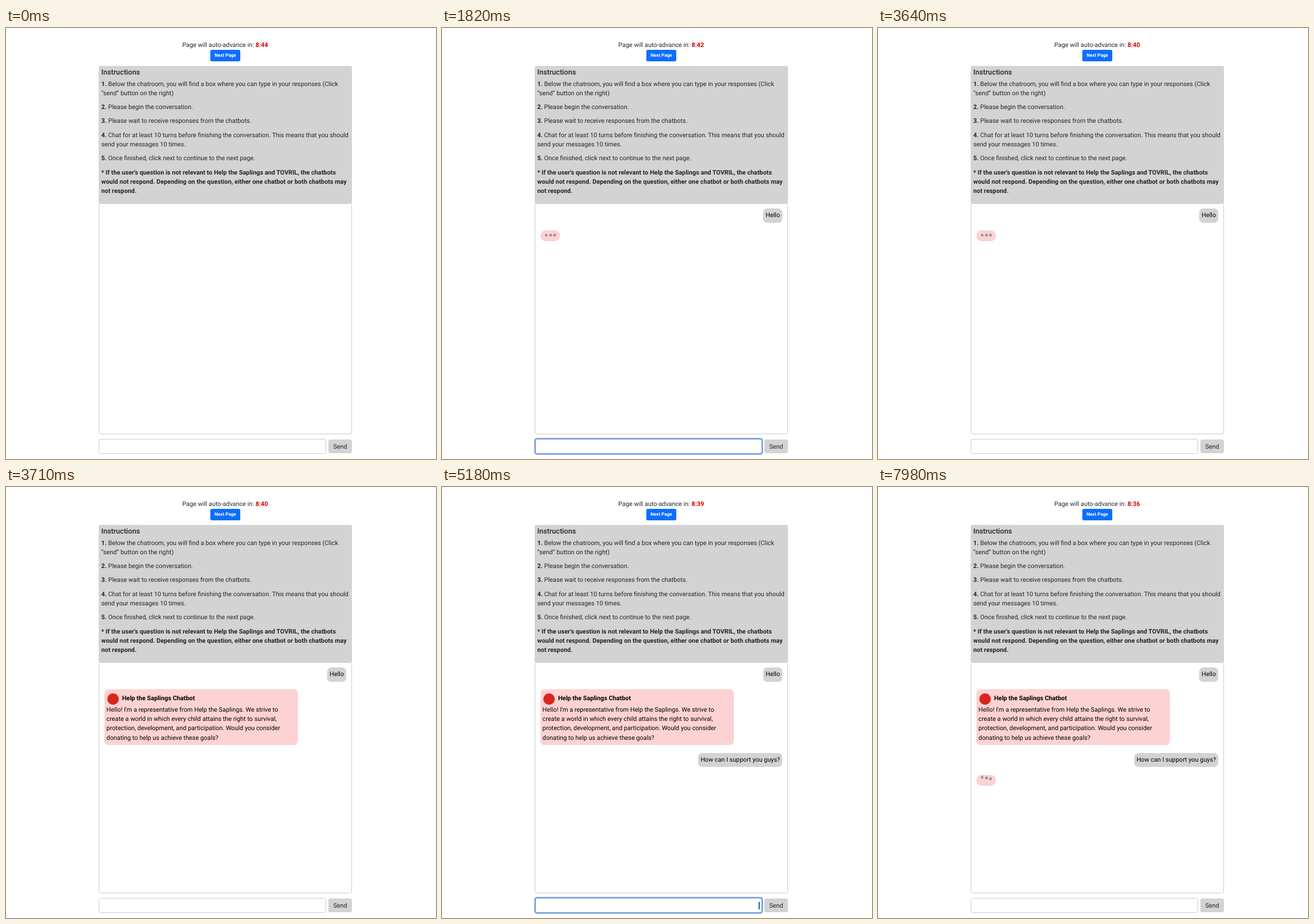
Recreate the animation shown at these times as an HTML page. Size 747 by 750 pixels, loop 8 s.

```html
<!DOCTYPE html>
<html lang="en">
<head>
<meta charset="utf-8">
<title>Chatroom</title>
<style>
html, body { margin: 0; width: 100%; height: 100%; overflow: hidden; background: #fff; }
#stage {
  position: relative; width: 747px; height: 750px; overflow: hidden; background: #fff;
  font: 10.8px/16.2px Roboto, Arial, sans-serif; color: #212529;
  text-rendering: geometricPrecision;
}
#stage div { position: absolute; box-sizing: border-box; white-space: pre; }
b { font-weight: 700; }
.gray { background: #d3d3d3; }
.field { border: 1px solid #ccc; border-radius: 3.5px; background: #fff; }
.mine { right: 155.8px; height: 24.6px; padding: 4.05px; border-radius: 6.75px; color: #000; }
.pink { background: #fdd2d2; left: 170.5px; color: #000; }
.dot { width: 4.8px; height: 4.8px; top: 6px; border-radius: 50%; background: #959595; }
#rules { font-size: 10.84px; }
#timer { color: #d20000; font-weight: 700; }
#typed { right: 197.6px; top: 720px; color: #212529; }
#ring { left: 161px; top: 714px; width: 396px; height: 28px; border: 2px solid #7199dc; border-radius: 4px; box-shadow: 0 0 0 1px #b4cbef; }
#caret { left: 550px; top: 722px; width: 2px; height: 13px; background: #1d5fb8; }
#beam { position: absolute; left: 467px; top: 721px; }
</style>
</head>
<body>
<div id="stage">
  <div style="left:306.3px;top:21.6px">Page will auto-advance in:</div>
  <div id="timer" style="left:433.6px;top:21.6px"></div>
  <div style="left:355px;top:38px;width:52px;height:20px;border-radius:2.5px;background:#0d6efd;color:#fff;font-size:8.1px;font-weight:700;line-height:18.4px;text-align:center">Next Page</div>

  <div class="gray" style="left:161px;top:66px;width:440px;height:239px;border-radius:3.4px 3.4px 0 0"></div>
  <div style="left:165.4px;top:70.2px;font-size:12.6px;font-weight:500">Instructions</div>
  <div id="rules"></div>

  <div class="field" style="left:161px;top:305px;width:440px;height:402px"></div>
  <div class="mine gray" id="hello" style="top:314.2px">Hello</div>
  <div class="pink" id="reply" style="top:352px;width:336.6px;height:96.6px;border-radius:6.75px">
    <div style="left:5.5px;top:6.5px;width:20px;height:20px;border-radius:50%;background:#d8271f"></div>
    <div style="left:31.2px;top:7.8px"><b>Help the Saplings Chatbot</b></div>
    <div style="left:4.1px;top:28px">Hello! I'm a representative from Help the Saplings. We strive to
create a world in which every child attains the right to survival,
protection, development, and participation. Would you consider
donating to help us achieve these goals?</div>
  </div>
  <div class="mine gray" id="ask" style="top:462.9px">How can I support you guys?</div>
  <div class="pink" id="wait" style="width:34.6px;height:19px;border-radius:9px">
    <div class="dot" style="left:8px"></div>
    <div class="dot" style="left:15.4px"></div>
    <div class="dot" style="left:22.7px"></div>
  </div>

  <div class="field" style="left:161px;top:714.6px;width:395px;height:26.6px"></div>
  <div id="ring"></div>
  <div id="typed"></div>
  <div id="caret"></div>
  <svg id="beam" width="11" height="16"><path d="M3 1.5Q5.5 1.5 5.5 3.5V12.5Q5.5 14.5 3 14.5M8 1.5Q5.5 1.5 5.5 3.5M5.5 12.5Q5.5 14.5 8 14.5" fill="none" stroke="#333"/></svg>
  <div class="gray" style="left:560.2px;top:715.8px;width:40.6px;height:24.6px;border-radius:3.4px;line-height:25px;text-align:center">Send</div>
</div>
<script>
const LOOP = 8000, STEP = 70;
const $ = id => document.getElementById(id);

// Paragraphs of the instructions; 16.2px lines, 8.1px gaps
const rules = [
  '<b>1.</b> Below the chatroom, you will find a box where you can type in your responses (Click\n“send” button on the right)',
  '<b>2.</b> Please begin the conversation.',
  '<b>3.</b> Please wait to receive responses from the chatbots.',
  '<b>4.</b> Chat for at least 10 turns before finishing the conversation. This means that you should\nsend your messages 10 times.',
  '<b>5.</b> Once finished, click next to continue to the next page.',
  "<b>* If the user's question is not relevant to Help the Saplings and TOVRIL, the chatbots\nwould not respond. Depending on the question, either one chatbot or both chatbots may\nnot respond.</b>"
];
let y = 89.6;
$('rules').innerHTML = rules.map(text => {
  const html = `<div style="left:165.5px;top:${y.toFixed(1)}px">${text}</div>`;
  y += text.split('\n').length * 16.2 + 8.1;
  return html;
}).join('');

// Each track is a list of [time, value]; a value holds until the next time
const tracks = {
  clock: [[0, 44], [560, 43], [1610, 42], [2590, 41], [3640, 40], [4690, 39], [5600, 38], [6650, 37], [7630, 36]],
  typed: [[0, ''], [980, 'Hello'], [1260, ''], [4970, 'How can I support you guys?'], [5180, '']],
  ring: [[0, 0], [490, .5], [560, 1], [1960, .5], [2030, 0], [4550, 1], [5880, .5], [5950, 0]],
  caret: [[0, 0], [560, 1], [1540, .6], [1610, .3], [1680, 0], [4550, 1], [5530, .5], [5600, 0]],
  beam: [[0, 0], [560, 1], [700, .5], [770, 0]],
  hello: [[0, 0], [1260, 1]],
  reply: [[0, 0], [3710, 1]],
  ask: [[0, 0], [5180, 1]],
  wait: [[0, 0], [1820, 1], [3710, 0], [5740, 1]]
};
const at = (name, t) => tracks[name].reduce((v, [time, next]) => t >= time ? next : v, 0);

// Typing dots hop one after another, then rest
const ease = 'ease-in-out';
const hops = [...document.querySelectorAll('.dot')].map((dot, i) => {
  const hop = dot.animate([
    { offset: 0, transform: 'translateY(0)', easing: ease },
    { offset: .28, transform: 'translateY(-4.7px)', easing: ease },
    { offset: .44, transform: 'translateY(0)' },
    { offset: 1, transform: 'translateY(0)' }
  ], { duration: 1760, delay: 200 + i * 100, iterations: Infinity });
  hop.pause();
  return hop;
});

function draw(time) {
  const t = Math.floor(time / STEP) * STEP;
  $('timer').textContent = '8:' + at('clock', t);
  $('typed').textContent = at('typed', t);
  for (const id of ['ring', 'caret', 'beam', 'hello', 'reply', 'ask', 'wait'])
    $(id).style.opacity = at(id, t);
  const second = t >= 5740;
  $('wait').style.top = (second ? 501.2 : 352.3) + 'px';
  const begin = second ? 5620 : 1690;
  for (const hop of hops) hop.currentTime = Math.max(0, t - begin);
}

const start = performance.now();
function tick() {
  draw((performance.now() - start) % LOOP);
  requestAnimationFrame(tick);
}
tick();
</script>
</body>
</html>
```
